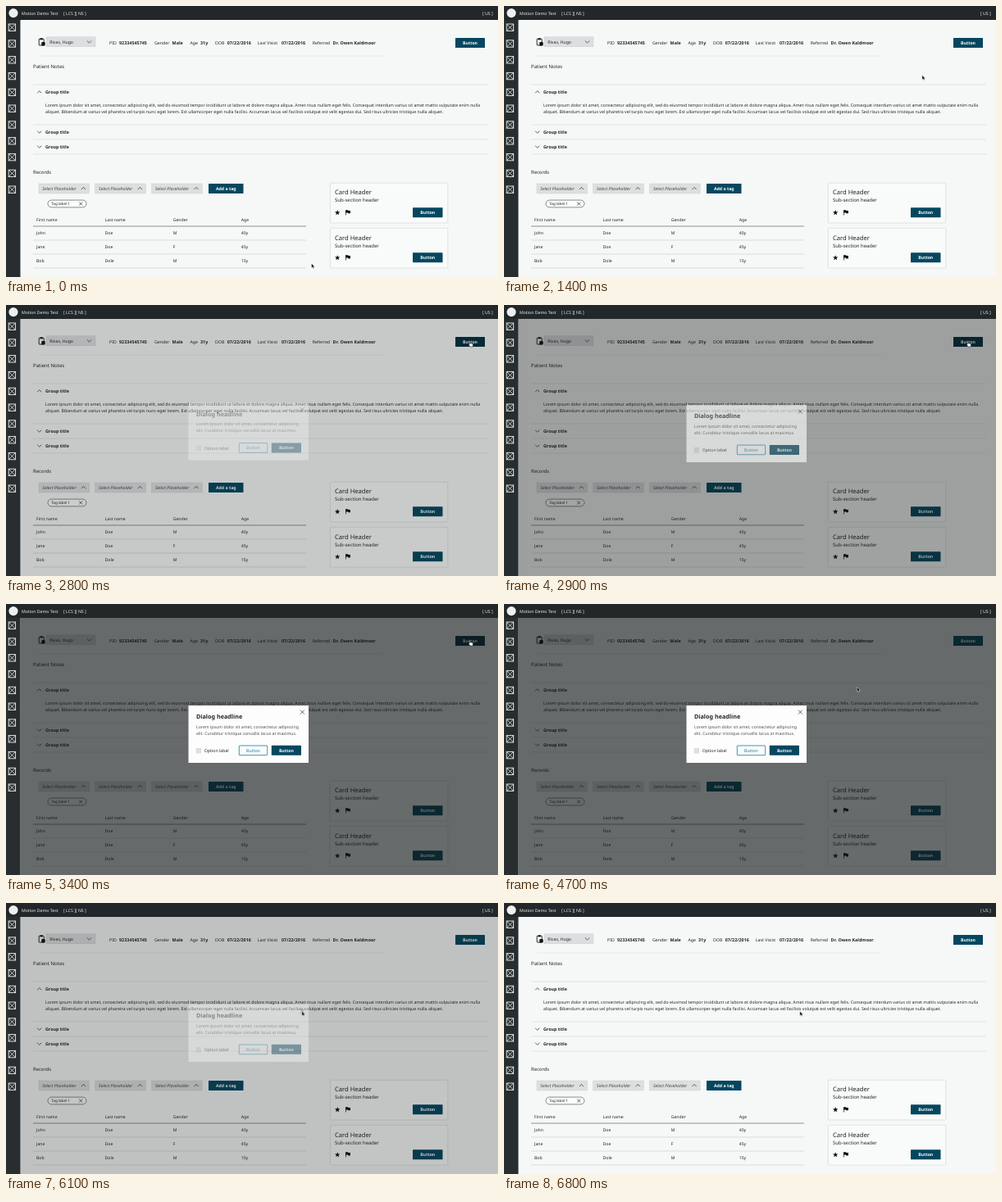
Write an HTML page that moves like this. It is 600 px wide and 331 px high and loops after 8900 ms.

```html
<!DOCTYPE html>
<html lang="en">
<head>
<meta charset="utf-8">
<title>Motion demo</title>
<style>
html, body { margin: 0; width: 100%; height: 100%; overflow: hidden; background: #f6f7f7; }
svg { display: block; width: 100vw; height: 100vh; }
text { font-family: "Noto Sans", "Open Sans", sans-serif; font-size: 5.2px; fill: #222627; text-rendering: geometricPrecision; white-space: pre; }
.b { font-weight: 700; }
.i { font-style: italic; }
.mid { text-anchor: middle; }
</style>
</head>
<body>
<svg id="stage" viewBox="0 0 600 331">
  <g id="page"></g>
  <rect id="shade" x="17.5" y="17" width="582.5" height="314" fill="#0f1414"/>
  <g id="dialog"></g>
  <g id="chrome"></g>
  <path id="arrow" d="M0 0V5.4L1.3 4.3L2.2 6.2L3.2 5.7L2.3 3.9H4Z" fill="#111" stroke="#fff" stroke-width=".4"/>
  <path id="hand" d="M1.1.6Q1.7 0 2.2.6V3Q3.9 2.7 5.4 3.6Q5.9 4.2 5.2 7H2L.1 4.5Q.2 3.8 1.1 4.3Z" fill="#fff" stroke="#111" stroke-width=".55"/>
</svg>
<script>
const LOOP = 8900, STEP = 100;
const INK = "#222627", TEAL = "#05475f", HOVER = "#04303f", GREY = "#dcdfe0";
const $ = id => document.getElementById(id);
let layer;

function add(tag, attrs, content) {
  const el = document.createElementNS("http://www.w3.org/2000/svg", tag);
  for (const k in attrs) el.setAttribute(k, attrs[k]);
  if (content) el.textContent = content;
  layer.append(el);
  return el;
}
const text = (x, y, s, cls = "", size = 5.2, fill = INK) =>
  add("text", { x, y, class: cls, style: `font-size:${size}px;fill:${fill}` }, s);
const rect = (x, y, width, height, fill, more = {}) =>
  add("rect", { x, y, width, height, fill, ...more });
const line = (d, stroke = INK, width = .7) =>
  add("path", { d, stroke, "stroke-width": width, fill: "none" });
const rule = (x1, x2, y, color = "#d3d6d7", w = .6) => line(`M${x1} ${y}H${x2}`, color, w);
const chevron = (x, y, dir) => line(`M${x - 2.6} ${y - dir * 1.3}l2.6 ${dir * 2.6}l2.6 ${-dir * 2.6}`);
const cross = (x, y, r, color, w) =>
  line(`M${x - r} ${y - r}L${x + r} ${y + r}M${x + r} ${y - r}L${x - r} ${y + r}`, color, w);

function button(x, y, w, label) {
  const box = rect(x, y, w, 12, TEAL, { rx: .6 });
  text(x + w / 2, y + 7.9, label, "b mid", 5.2, "#fff");
  return box;
}

function card(y) {
  rect(395.4, y, 143.4, 48.8, "#f9fafa", { stroke: "#d0d3d4", "stroke-width": .6, rx: .8 });
  text(401, y + 14.2, "Card Header", "", 7.6);
  text(401, y + 23.2, "Sub-section header", "", 5.95);
  let star = "";
  for (let k = 0; k < 10; k++) {
    const r = k % 2 ? 1.4 : 3.4, a = k * Math.PI / 5;
    star += `${404.2 + r * Math.sin(a)},${y + 36.3 - r * Math.cos(a)} `;
  }
  add("polygon", { points: star, fill: "#111" });
  add("path", { d: `M414 ${y + 33}h3l.5.8h2.4v3.3h-2.7l-.5-.8h-2v3h-.7z`, fill: "#111" });
  button(496, y + 30, 36.5, "Button");
}

// Page content
layer = $("page");
rect(0, 0, 600, 331, "#f6f7f7");
rect(40.2, 40.2, 6, 7.8, "none", { stroke: "#111", "stroke-width": .9, rx: .5 });
rect(41.6, 39.3, 3.2, 2, "#111");
rect(43.3, 44, 4.4, 4.6, "#111", { rx: 1 });
rect(49, 37.8, 60, 12, GREY, { stroke: "#c5c9ca", "stroke-width": .4 });
text(53.3, 45.6, "Rivas, Hugo");
chevron(101.5, 43.8, 1);
[[126, "PID"], [138, "92334545745", 1], [181, "Gender"], [202.6, "Male", 1],
 [224.5, "Age"], [237, "31y", 1], [255, "DOB"], [269.7, "07/22/2016", 1],
 [306.8, "Last Visist"], [336, "07/22/2016", 1], [373.7, "Referred"],
 [398.6, "Dr. Owen Kaldmoor", 1]]
  .forEach(([x, s, bold]) => text(x, 46.9, s, bold ? "b" : "", bold ? 5.4 : 5.25));
const mainButton = button(548, 39, 36, "Button");
rule(40, 460, 61, "#dde0e1");

text(33, 76.3, "Patient Notes", "", 6);
rule(33, 588, 96);
[105, 154, 172].forEach((y, k) => {
  chevron(40.7, y, k ? 1 : -1);
  text(48, y + 1.9, "Group title", "b", 5.35);
});
text(48, 122.9, "Lorem ipsum dolor sit amet, consectetur adipiscing elit, sed do eiusmod tempor incididunt ut labore et dolore magna aliqua. Amet risus nullam eget felis. Consequat interdum varius sit amet mattis vulputate enim nulla", "", 5.19);
text(48, 130.9, "aliquet. Bibendum at varius vel pharetra vel turpis nunc eget lorem. Est ullamcorper eget nulla facilisi. Accumsan lacus vel facilisis volutpat est velit egestas dui. Sed risus ultricies tristique nulla aliquet.", "", 5.19);
[145, 163, 181].forEach(y => rule(33, 588, y));

text(33, 205.4, "Records", "", 5.9);
[40, 108.8, 177.6].forEach(x => {
  rect(x, 217, 61.6, 12, GREY, { stroke: "#c5c9ca", "stroke-width": .4 });
  text(x + 4.3, 224.8, "Select Placeholder", "i", 5.15, "#3c4244");
  chevron(x + 54.5, 222.8, -1);
});
button(247, 217, 42.5, "Add a tag");
rect(51, 237.1, 47, 8.8, "#fbfcfc", { rx: 4.4, stroke: "#3c4244", "stroke-width": .6 });
text(55.2, 243.1, "Tag label 1", "", 4.55);
cross(91.2, 241.5, 2, INK, .7);

[["First name", "Last name", "Gender", "Age"], ["John", "Doe", "M", "40y"],
 ["Jane", "Doe", "F", "45y"], ["Bob", "Dole", "M", "15y"]].forEach((row, r) => {
  const y = r ? 262.4 + 17 * r : 262.9;
  row.forEach((s, c) => text([37, 120.6, 203.7, 286.7][c], y, s, "", 5.15));
  rule(33, 366, 269 + 17 * r, r ? "#c6cacb" : "#70777a", r ? .6 : .8);
});
card(216.2);
card(271.3);

// Dialog
layer = $("dialog");
rect(222.5, 124, 146.5, 70, "#fdfdfd");
text(232, 140.4, "Dialog headline", "b", 7.2);
text(232, 151.9, "Lorem ipsum dolor sit amet, consectetur adipiscing", "", 5.19, "#4b5154");
text(232, 159.9, "elit. Curabitur tristique convallis lacus at maximus.", "", 5.19, "#4b5154");
rect(232, 176.3, 5.8, 5.8, "#dfe1e2", { stroke: "#c8cbcc", "stroke-width": .4 });
text(241.8, 181.1, "Option label");
rect(284.3, 173, 34.4, 11.7, "#fdfdfd", { stroke: "#15799b", "stroke-width": .8, rx: .6 });
text(301.4, 180.6, "Button", "mid", 5.2, "#15799b");
button(323.8, 172.8, 36.2, "Button");
cross(361.4, 132, 2.5, INK, .7);

// Top bar and side rail
layer = $("chrome");
rect(0, 0, 17.5, 331, "#282e30");
rect(0, 0, 600, 17, "#222729");
add("circle", { cx: 9, cy: 8.6, r: 5.6, fill: "#eef0f0" });
text(19, 10.7, "Motion Demo Test", "", 5.2, "#eef0f0");
text(70, 10.7, "[ LCS ][ NS ]", "", 5.2, "#eef0f0");
text(581, 10.7, "[ US ]", "", 5.2, "#eef0f0");
for (let k = 0; k < 11; k++) {
  const y = 26.2 + 19.8 * k;
  rect(3.2, y - 4.2, 8.4, 8.4, "none", { stroke: "#eef0f0", "stroke-width": .9 });
  cross(7.4, y, 4, "#eef0f0", .8);
}

// Pointer stops: time, x, y
const stops = [[0, 372.5, 314.5], [500, 417, 169], [600, 417, 169], [1200, 508, 86],
  [1300, 508, 86], [2200, 563.5, 45.5], [2400, 564, 44], [3500, 564, 44],
  [4300, 455, 91], [4400, 455, 91], [5300, 360.5, 131.5], [5500, 360.8, 132.3], [LOOP, 360.8, 132.3]];
const clamp = v => Math.max(0, Math.min(1, v));

function pointer(t) {
  const n = stops.findIndex(s => s[0] > t);
  const [t0, x0, y0] = stops[n - 1], [t1, x1, y1] = stops[n];
  const p = (t - t0) / (t1 - t0), e = p * p * (3 - 2 * p);
  return [x0 + (x1 - x0) * e, y0 + (y1 - y0) * e];
}

function draw(t) {
  const opening = clamp((t - 2685) / 350);
  const shown = t < 5000 ? opening : 1 - clamp((t - 5900) / 320);
  const drop = -8 * Math.pow(1 - opening, 1.5);
  $("shade").setAttribute("opacity", .62 * shown);
  $("dialog").setAttribute("opacity", shown);
  $("dialog").setAttribute("transform", `translate(0 ${drop})`);

  const [x, y] = pointer(t);
  const onMain = x >= 548 && y >= 39 && y <= 51;
  const onClose = t > 5000 && t < 6000 && x < 364.5;
  mainButton.setAttribute("fill", onMain ? HOVER : TEAL);
  const hand = onMain || onClose;
  $("hand").setAttribute("visibility", hand ? "visible" : "hidden");
  $("arrow").setAttribute("visibility", hand ? "hidden" : "visible");
  $(hand ? "hand" : "arrow").setAttribute("transform", `translate(${x} ${y})`);
}

const start = performance.now();
function tick() {
  const t = (performance.now() - start) % LOOP;
  draw(Math.floor(t / STEP) * STEP);
  requestAnimationFrame(tick);
}
tick();
</script>
</body>
</html>
```
